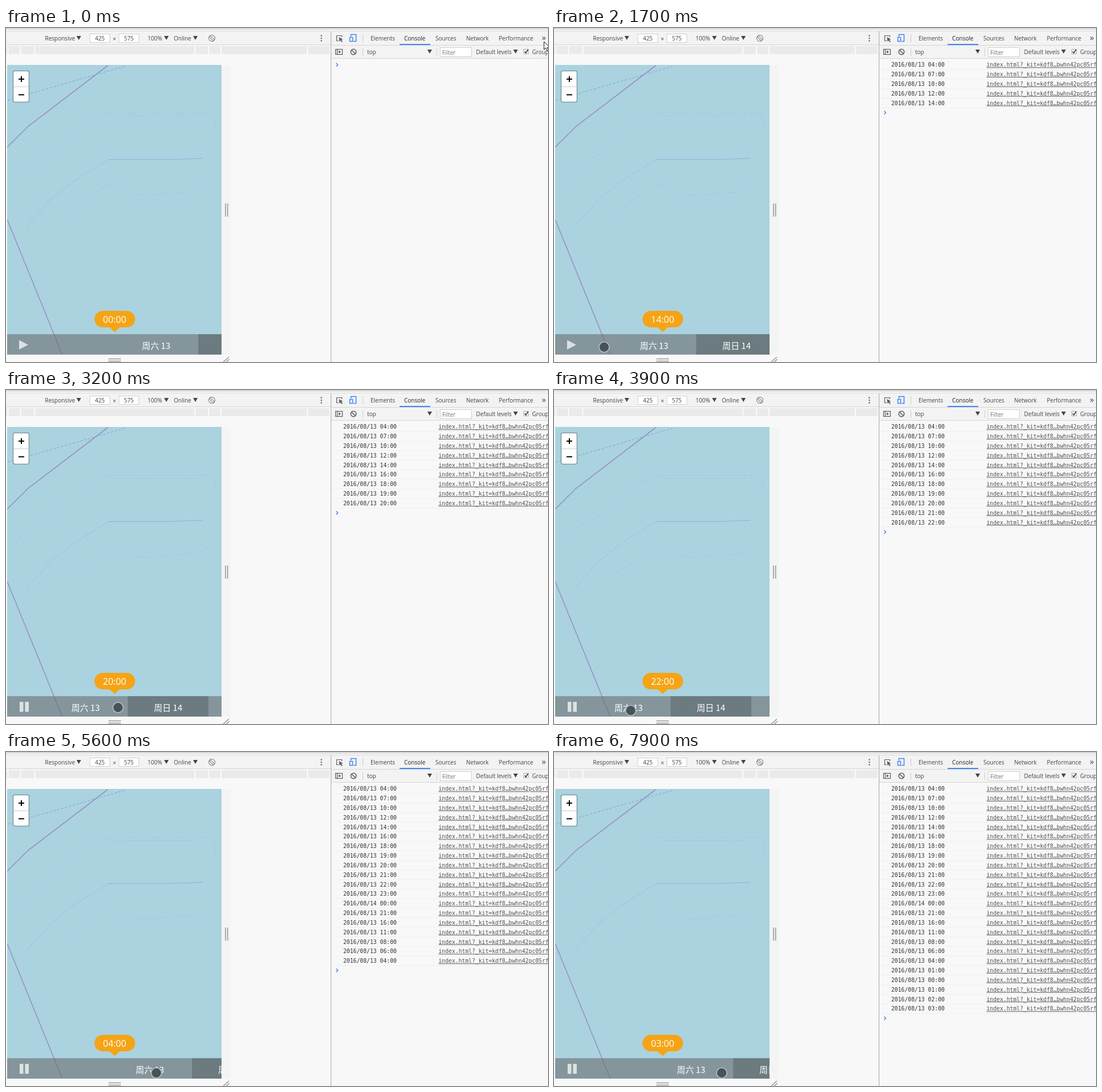
An HTML page that plays this animation: 953 px wide and 588 px high, repeating every 8 s.

```html
<!DOCTYPE html>
<html lang="zh">
<head>
<meta charset="utf-8">
<title>Timeline control</title>
<style>
  html, body { margin: 0; width: 100%; height: 100%; overflow: hidden; background: #f8f8f8; }
  svg { display: block; }
  text { font: 10px "Open Sans", sans-serif; fill: #444; white-space: pre; }
  .mid { text-anchor: middle; }
  .mono text { font: 9.75px "DejaVu Sans Mono", monospace; fill: #303030; }
  .mono .link { fill: #545454; text-decoration: underline; text-decoration-skip-ink: none; }
  .day text { font: 15px "Noto Sans CJK SC", "Noto Sans CJK", sans-serif; fill: #fff; text-anchor: middle; }
  #label { font-size: 16px; fill: #fff; text-anchor: middle; }
  .icon { fill: none; stroke: #5a5a5a; stroke-width: 1.2; }
  .input { fill: #fff; stroke: #d0d0d0; }
  .sep { stroke: #ccc; }
  .grip { stroke: #999; stroke-width: 1.6; }
  .zoom { stroke: #000; stroke-width: 2; }
</style>
</head>
<body>
<svg width="953" height="588" viewBox="0 0 953 588">
  <defs>
    <clipPath id="device"><path d="M2 65H379V575H2z"/></clipPath>
    <path id="down" d="M-4-4H4L0 3z" fill="#444"/>
  </defs>

  <rect width="953" height="588" fill="#f8f8f8"/>
  <rect width="953" height="30" fill="#f3f3f3"/>
  <path d="M0 1.500H953" stroke="#bdbdbd"/>
  <path d="M0 5.500H953" stroke="#dcdcdc"/>
  <path d="M0 29.500H571" stroke="#d4d4d4"/>

  <!-- device toolbar -->
  <text x="68.500" y="21.500">Responsive</text><use href="#down" x="128" y="18"/>
  <rect class="input" x="147.500" y="10.500" width="35" height="15"/>
  <rect class="input" x="198.500" y="10.500" width="35" height="15"/>
  <text class="mid" x="165" y="21.500">425</text>
  <text class="mid" x="190.500" y="22.500">×</text>
  <text class="mid" x="216" y="21.500">575</text>
  <text x="249" y="21.500">100%</text><use href="#down" x="282" y="18"/>
  <text x="295" y="21.500">Online</text><use href="#down" x="333" y="18"/>
  <g class="icon" transform="translate(362 18) rotate(-45)" style="stroke:#777; stroke-width:1">
    <circle r="5.500"/><rect x="-1.500" y="-5" width="3" height="10"/>
  </g>
  <path d="M554.500 13.500v10" stroke="#5a5a5a" stroke-width="2.400" stroke-linecap="round" stroke-dasharray="0 4.500"/>
  <rect y="32" width="569" height="14" fill="#eaeaea"/>
  <path d="M3.500 32v14M25.500 32v14M50.500 32v14M332 32v14M356 32v14M378 32v14M530 32v14" stroke="#fafafa" stroke-width="2"/>

  <!-- map -->
  <rect x="379" y="66" width="16" height="509" fill="#f4f4f4"/>
  <rect x="2" y="65" width="377" height="510" fill="#aad3df"/>
  <g clip-path="url(#device)" fill="none">
    <path d="M179 66L39 173L2 210M2 337L99 575" stroke="#9a8fc6" stroke-width="1.600"/>
    <path d="M3 127L210 67" stroke="#7d9fd8" stroke-dasharray="4 3"/>
    <g stroke="#7fa3e0">
      <path d="M16 275Q22 260 45 238L88 219L112 190L145 167L182 150H360Q370 155 368 180" stroke-dasharray="1 5"/>
      <path d="M190 155.500H340" stroke-dasharray="1 4"/>
      <path d="M110 322L182 274Q230 306 292 288Q325 295 362 274" stroke-dasharray="1 5"/>
      <g stroke="#6a90dc">
        <path d="M36 349L80 301L118 270L180 232" stroke-dasharray="1 3"/>
        <path d="M180 231.500H290L345 229.500" stroke-dasharray="1 1"/>
      </g>
    </g>
  </g>
  <rect x="12.500" y="75.500" width="28" height="55" rx="3" fill="#fff" stroke="#7c9ba4" stroke-width="1.500"/>
  <path d="M13 103.500H40" stroke="#ccc"/>
  <path class="zoom" d="M22 90h10M27 85v10M22 117.500h10"/>

  <!-- timeline -->
  <g clip-path="url(#device)">
    <rect x="2" y="539" width="377" height="36" fill="#686868" fill-opacity=".56"/>
    <g class="day" id="days">
      <rect x="338" y="539" width="142" height="36" fill-opacity=".18"/>
      <text x="264" y="564.500">周六 13</text>
      <text x="409" y="564.500">周日 14</text>
    </g>
    <path id="button" fill="#dce1e2"/>
  </g>
  <path d="M170 498H212.500A14.500 14.500 0 0 1 212.500 527H200L191 535L182 527H170A14.500 14.500 0 0 1 170 498z" fill="#f5a415"/>
  <text id="label" x="191" y="519"></text>

  <path class="grip" d="M386 309v23M389.700 309v23M180 582.500h22M180 586.500h22M382 588l10-9M387 588l6-5"/>

  <!-- console panel -->
  <rect x="572" y="6" width="381" height="48" fill="#f3f3f3"/>
  <path d="M572 30.500H953M572 53.500H953" stroke="#d6d6d6"/>
  <path d="M571.500 6V588" stroke="#a8a8a8"/>
  <g class="icon">
    <path d="M585 22.500H581.500V13.500H590.500V16"/>
    <path d="M585.500 16l7 4-3 .800 2.500 3-1.400 1.200-2.400-3-1.700 2z" fill="#5a5a5a" stroke="none"/>
    <path d="M606.500 15V11.500H615.500V23.500H611M604.500 16.500h5v7h-5z" stroke="#4285f4" stroke-width="1.500"/>
    <rect x="579.500" y="37.500" width="12" height="9"/><path d="M582.500 37v10"/>
    <path d="M585 39.500v5l4-2.500z" fill="#5a5a5a" stroke="none"/>
    <circle cx="611" cy="42" r="4.700" stroke-width="1.600"/><path d="M607.700 38.700l6.600 6.600" stroke-width="1.600"/>
  </g>
  <path class="sep" d="M627.500 11v14M627.500 36v13M757.500 36v13"/>
  <text x="641" y="21.500">Elements</text>
  <text x="700" y="21.500" style="fill:#222">Console</text>
  <text x="755" y="21.500">Sources</text>
  <text x="809" y="21.500">Network</text>
  <text x="866.500" y="21.500">Performance</text>
  <text x="942" y="22" style="font-size:15px">»</text>
  <path d="M692 29H746" stroke="#4285f4" stroke-width="2"/>
  <text x="635" y="45.500">top</text><use href="#down" x="745" y="42"/>
  <rect class="input" x="763.500" y="34.500" width="55" height="16"/>
  <text x="767" y="46.500" style="fill:#757575">Filter</text>
  <text x="826.500" y="45.500">Default levels</text><use href="#down" x="896" y="42"/>
  <rect x="910.500" y="37.500" width="8" height="8" fill="#fff" stroke="#aaa"/>
  <path d="M912 41.500l2 2.500 4-6" fill="none" stroke="#333" stroke-width="1.600"/>
  <text x="925" y="45.500">Group</text>

  <g class="mono" id="rows"></g>
  <path id="prompt" d="M580.500-3l3 3-3 3" fill="none" stroke="#4285f4" stroke-width="1.500"/>

  <circle id="touch" r="9" fill="#485257" stroke="#b4bfc2" stroke-width="1.600"/>
  <path id="arrow" d="M0 0V14L3.200 11L5.500 16.500L7.800 15.500L5.500 10.200H10z" fill="#fff" stroke="#111"/>
</svg>

<script>
const LOOP = 8000, STEP = 100;
const HOUR = 6;            // px per hour on the timeline
const PLAY_SPEED = 0.0132; // px per ms
const ROW = 16.83, FIRST_ROW = 64.8;
const $ = id => document.getElementById(id);

const linear = k => k;
const sineOut = k => Math.sin(k * Math.PI / 2);

// Pointer key points; the ease leads to the point
const pointer = [
  { time: 0, x: 946, y: 24 },
  { time: 700, x: 147, y: 560 },
  { time: 1000, x: 177, y: 562 },
  { time: 1200, x: 167, y: 561 },
  { time: 2200, x: 55.5, y: 562, ease: sineOut },
  { time: 2600, x: 30, y: 561 },
  { time: 2900, x: 30, y: 561 },
  { time: 3200, x: 197, y: 559 },
  { time: 4000, x: 126, y: 565 },
  { time: 4700, x: 126, y: 565 },
  { time: 4950, x: 132, y: 565 },
  { time: 5233, x: 217, y: 565 },
  { time: 5500, x: 249, y: 565 },
  { time: 5800, x: 295, y: 565 }
];

function pointerAt(t) {
  const i = pointer.findIndex(p => p.time > t);
  if (i < 0) return pointer.at(-1);
  const a = pointer[i - 1], b = pointer[i];
  const k = (b.ease || linear)((t - a.time) / (b.time - a.time));
  return { x: a.x + (b.x - a.x) * k, y: a.y + (b.y - a.y) * k };
}

const played = (t, since) => Math.max(0, t - since) * PLAY_SPEED;

// Drag forward, play, drag back, play again
function scrollAt(t) {
  if (t <= 1200) return 0;
  if (t < 2200) return 177 - pointerAt(t).x;
  if (t < 4950) return Math.min(144.5, 121.5 + played(t, 2990));
  if (t < 6000) return Math.max(0, 276 - pointerAt(t).x);
  return played(t, 6150);
}

// The reading trails the backward drag by one step
function hourAt(t) {
  const draggingBack = t > 4950 && t < 6000;
  return Math.floor(scrollAt(draggingBack ? t - STEP : t) / HOUR);
}

const clock = hour => String(hour % 24).padStart(2, "0") + ":00";

// Every change of the hour is written to the console
const logs = [];
for (let time = STEP; time < LOOP; time += STEP) {
  const hour = hourAt(time);
  if (hour !== hourAt(time - STEP)) logs.push({ time, hour });
}

$("rows").innerHTML = logs.map(({ hour }, i) => {
  const y = FIRST_ROW + i * ROW;
  return `<g><text x="593" y="${y + 3.5}">2016/08/${hour < 24 ? 13 : 14} ${clock(hour)}</text>
    <text class="link" x="760.500" y="${y + 3.5}">index.html?_kit=kdf8…bwhn42pc05rf</text>
    <path d="M572 ${y + ROW / 2}H953" stroke="#f0f0f0"/></g>`;
}).join("");
const rows = [...$("rows").children];

const show = (node, visible) => node.style.display = visible ? "" : "none";

function draw(t) {
  const { x, y } = pointerAt(t);
  for (const id of ["touch", "arrow"]) {
    $(id).setAttribute("transform", `translate(${x} ${y})`);
    show($(id), (x < 380) === (id === "touch"));
  }

  $("days").setAttribute("transform", `translate(${-Math.floor(scrollAt(t))} 0)`);
  $("button").setAttribute("d", t < 2800
    ? "M23 549.500V566L39 557.700z"
    : "M24 549h6.500v17.500h-6.500zM33.500 549h6.500v17.500h-6.500z");
  $("label").textContent = clock(hourAt(t));

  const shown = logs.filter(log => log.time <= t).length;
  rows.forEach((row, i) => show(row, i < shown));
  $("prompt").setAttribute("transform", `translate(0 ${FIRST_ROW + shown * ROW})`);
}

const start = performance.now();
function tick() {
  const t = (performance.now() - start) % LOOP;
  draw(Math.floor(t / STEP) * STEP);
  requestAnimationFrame(tick);
}
tick();
</script>
</body>
</html>
```
